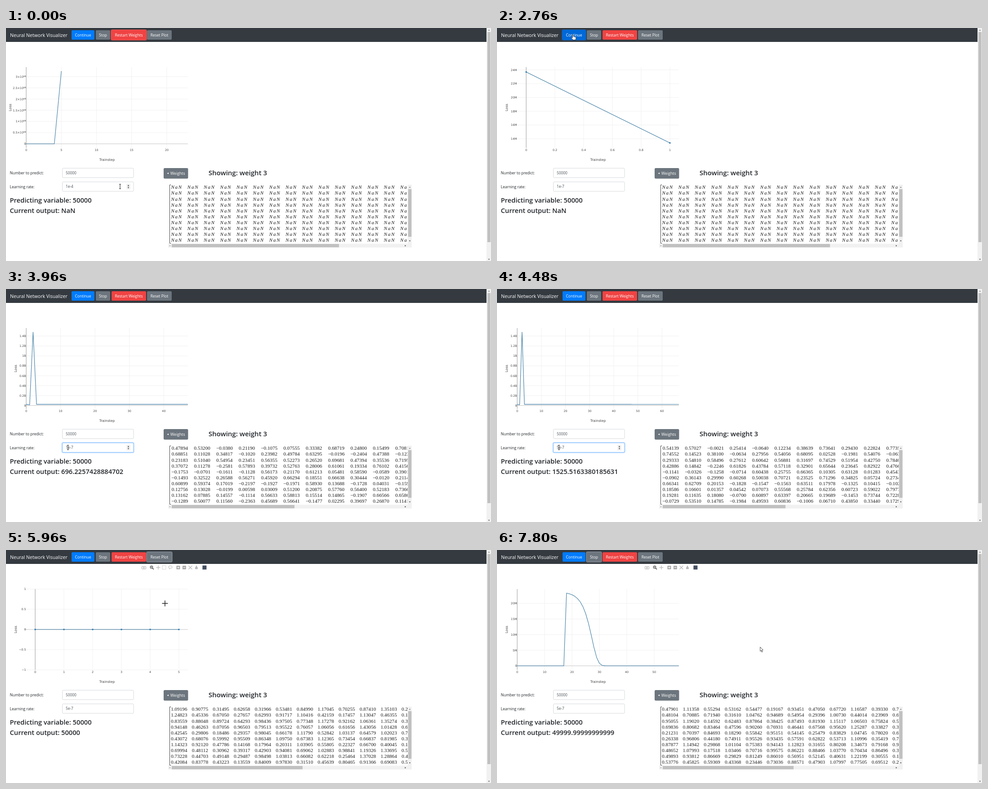
Write an HTML page with a canvas that moves like this. It is 1080 by 519 pixels and loops after 7.84 s.

```html
<!DOCTYPE html>
<html lang="en">
<head>
<meta charset="utf-8">
<title>Neural Network Visualizer</title>
<style>
html, body { margin: 0; width: 100%; height: 100%; overflow: hidden; background: #fff; }
canvas { display: block; width: 100vw; height: 100vh; }
</style>
</head>
<body>
<canvas id="stage" width="1080" height="519"></canvas>
<script>
const ctx = document.getElementById('stage').getContext('2d');
const LOOP = 7840, FRAME = 40;
const ROWS = 10, COLS = 20;
const UI = '"Open Sans", "Noto Sans", sans-serif';
const TICK = '"DejaVu Sans", sans-serif';
const MATH = '"Liberation Serif", serif';

// ---------- timeline ----------
const focusKeys = [[0, 'restart'], [120, 'rate'], [960, 'continue'], [1240, 'restart'],
  [1640, 'rate'], [2480, 'reset'], [2720, 'continue'], [3600, 'rate'], [5800, 'reset'],
  [6270, 'restart'], [7350, 'stop']];
const rateKeys = [[0, '1e-4'], [200, '1e-'], [320, '1e-5'], [1760, '1e-'], [1900, '1e-7'],
  [4320, 'e-7'], [4440, '5e-7']];

// the pointer rests at each place from one time to another and glides between
const stops = [
  { x: 254, y: 353, from: 0, to: 400 },
  { x: 170, y: 16, from: 720, to: 1000 },
  { x: 299, y: 20, from: 1160, to: 1280 },
  { x: 254, y: 353, from: 1600, to: 2080 },
  { x: 340, y: 16, from: 2400, to: 2520 },
  { x: 168, y: 15, from: 2680, to: 2800 },
  { x: 138, y: 353, from: 3400, to: 4480 },
  { x: 231, y: 412, from: 4920, to: 5160 },
  { x: 340, y: 16, from: 5720, to: 5820 },
  { x: 354, y: 119, from: 5960, to: 6060 },
  { x: 272, y: 16, from: 6220, to: 6360 },
  { x: 215, y: 16, from: 7240, to: 7400 },
  { x: 586, y: 216, from: 7640, to: LOOP }
];

const keyed = (keys, t) => keys.filter(k => k[0] <= t).pop()[1];

function pointerAt(t) {
  const i = stops.findIndex(s => t <= s.to), b = stops[i];
  if (t >= b.from) return b;
  const a = stops[i - 1], u = (t - a.to) / (b.from - a.to), e = u * u * (3 - 2 * u);
  return { x: a.x + (b.x - a.x) * e, y: a.y + (b.y - a.y) * e };
}

function training(t) {
  if (t < 2480) return { run: 'diverge', step: t < 1020 ? 23 : Math.min(30, 23 + Math.floor((t - 1020) * 0.029)) };
  if (t < 2730) return { run: 'empty', step: 0 };
  if (t < 5830) {
    const s = t < 3960 ? 1 + (t - 2760) * 46 / 1200 : 47 + (t - 3960) * 38 / 960;
    return { run: 'slow', step: Math.max(0, Math.floor(s + 1e-6)) };
  }
  return { run: 'fast', step: Math.min(59, Math.floor((t - 5830) * 0.0389)) };
}

// ---------- model ----------
const GOAL = 50000, SPEEDUP = 67, RESTART = 18;

// share of the goal reached after k steps at the higher learning rate
function learned(k) {
  let f = 0.0105;
  for (let i = 0; i < k; i++) f += 0.705 * f ** 1.1 * (1 - f);
  return f;
}

function progress(run, step) {
  if (run === 'fast') return step < RESTART ? 1 : learned(step - RESTART);
  const early = 696.2257428884702 / GOAL * 1.04 ** (step - 47);
  return step < SPEEDUP ? early : Math.max(early, learned(step - SPEEDUP));
}

function loss(run, i) {
  if (run === 'diverge') {
    if (i === 5) return 3.25;
    return i < 5 || (i > 23 && i < 28) ? 0 : NaN;
  }
  if (run === 'slow' && i === 1) return 13.4;
  if (run === 'slow' && i === 2) return 1480;
  return 23.8 * (1 - progress(run, i)) ** 2;
}

const isNaNState = (run, step, t) => t < 2790 && !(run === 'diverge' && step > 23 && step < 28);

function outputText(run, step, t) {
  if (isNaNState(run, step, t)) return 'NaN';
  if (run === 'diverge') return '3.738738274169252e+' + Math.round(53 / 3 ** (27 - step));
  return String(GOAL * progress(run, step));
}

function random(seed, i, j) {
  const v = Math.sin(seed * 91.7 + i * 12.9898 + j * 78.233) * 43758.5453;
  return v - Math.floor(v);
}

const grid = cell => Array.from({ length: ROWS }, (_, i) => Array.from({ length: COLS }, (_, j) => cell(i, j)));

// random starting weights plus an outer product that grows with training
function cells(run, step, t) {
  if (isNaNState(run, step, t)) return grid(() => 'NaN');
  if (run === 'diverge') {
    const scale = 0.83 ** (27 - step);
    return grid((i, j) => ((0.97 + 0.5 * random(1, i, 0)) * (8.9 + 5.5 * random(2, 0, j)) * scale)
      .toPrecision(7).replace('.', ''));
  }
  const seed = run === 'fast' && step >= RESTART ? 7 : 4;
  const amount = progress(run, step) ** 0.3;
  return grid((i, j) => {
    const start = -0.42 + 0.95 * random(seed, i, j);
    const gain = (0.92 + 0.16 * random(seed + 1, i, 0)) * (0.45 + 0.55 * random(seed + 2, 0, j));
    return (start + gain * amount).toFixed(7).slice(0, 7).replace('-', '\u2212');
  });
}

// ---------- drawing helpers ----------
function text(s, x, y, size, color, { font = UI, weight = 400, align = 'left', style = '' } = {}) {
  ctx.font = `${style} ${weight} ${size}px ${font}`;
  ctx.textAlign = align;
  ctx.fillStyle = color;
  ctx.fillText(s, x, y);
}

function box(x, y, w, h, r, fill, stroke, lw = 1) {
  ctx.beginPath();
  ctx.roundRect(x, y, w, h, r);
  if (fill) { ctx.fillStyle = fill; ctx.fill(); }
  if (stroke) { ctx.strokeStyle = stroke; ctx.lineWidth = lw; ctx.stroke(); }
}

function line(points, color, lw) {
  ctx.beginPath();
  points.forEach(([x, y]) => ctx.lineTo(x, y));
  ctx.strokeStyle = color;
  ctx.lineWidth = lw;
  ctx.stroke();
}

function shape(points, fill, stroke, lw = 1) {
  ctx.beginPath();
  points.forEach(([x, y]) => ctx.lineTo(x, y));
  ctx.closePath();
  ctx.fillStyle = fill;
  ctx.fill();
  if (stroke) { ctx.strokeStyle = stroke; ctx.lineWidth = lw; ctx.stroke(); }
}

function circle(x, y, r, fill, stroke, lw = 1.2) {
  box(x - r, y - r, 2 * r, 2 * r, r, fill, stroke, lw);
}

function plus(x, y, r, color, lw) {
  line([[x - r, y], [x + r, y]], color, lw);
  line([[x, y - r], [x, y + r]], color, lw);
}

function arrow(x, y, dx, dy, r, color) {
  shape([[x + dx * r, y + dy * r], [x - dx * r + dy * r, y - dy * r + dx * r],
    [x - dx * r - dy * r, y - dy * r - dx * r]], color);
}

// ---------- page parts ----------
const grey = { fill: '#6c757d', hover: '#5a6268', ring: '#868e95' };
const buttons = [
  { id: 'continue', label: 'Continue', x: 146, w: 51, fill: '#007bff', hover: '#0069d9', ring: '#0a66cc' },
  { id: 'stop', label: 'Stop', x: 200, w: 32, ...grey },
  { id: 'restart', label: 'Restart Weights', x: 235, w: 77, fill: '#f04343', hover: '#d52f33', ring: '#f8504c' },
  { id: 'reset', label: 'Reset Plot', x: 314, w: 55, ...grey }
];
const hits = (b, p) => p.y > 4 && p.y < 26 && p.x > b.x && p.x < b.x + b.w;
const inField = (p, y) => p.x > 125 && p.x < 284 && p.y > y && p.y < y + 22;

function navbar(focus, p) {
  ctx.fillStyle = '#343a40';
  ctx.fillRect(0, 0, 1070, 31);
  text('Neural Network Visualizer', 9, 19.5, 10.6, '#fff');
  for (const b of buttons) {
    if (focus === b.id) box(b.x - .8, 4.2, b.w + 1.6, 22.6, 2.5, null, b.ring, 1.6);
    box(b.x, 5, b.w, 21, 2, hits(b, p) ? b.hover : b.fill);
    text(b.label, b.x + b.w / 2, 18.5, 8.5, '#fff', { align: 'center' });
  }
}

function pageScrollbar() {
  ctx.fillStyle = '#f1f1f1';
  ctx.fillRect(1070, 0, 10, 519);
  ctx.fillStyle = '#c1c1c1';
  ctx.fillRect(1072, 9, 7, 468);
  arrow(1075.5, 4.5, 0, -1, 1.5, '#777');
  arrow(1075.5, 515.5, 0, 1, 1.5, '#555');
}

function field(label, value, y, focused, spinner) {
  text(label, 8.5, y + 14, 8.5, '#212529');
  if (focused) box(124.7, y - .8, 160, 22.6, 3, null, 'rgba(0,123,255,.28)', 2);
  box(125.5, y, 158.5, 21, 2, '#fff', focused ? '#80bdff' : '#ced4da', .9);
  text(value, 133, y + 13.6, 8.3, '#495057');
  if (spinner) {
    box(268, y + 4, 9, 13, 1, '#f1f1f1');
    arrow(272.5, y + 7.8, 0, -1, 1.6, '#444');
    arrow(272.5, y + 13.2, 0, 1, 1.6, '#444');
  }
}

function ticks(lo, hi) {
  const rough = (hi - lo) / 9, base = 10 ** Math.floor(Math.log10(rough)), out = [];
  const d = base * [2, 5, 10].find(m => base * m >= rough - 1e-9);
  for (let i = Math.ceil(lo / d - 1e-6); i * d <= hi + d * 1e-6; i++) out.push(+(i * d).toFixed(6));
  return out;
}

const signed = v => String(v).replace('-', '\u2212');

function yLabel(v, y, run, hi) {
  const opt = { font: TICK, align: 'right' };
  if (run === 'diverge' && v) {
    text('68', 44.5, y + .3, 4.4, '#444', opt);
    text(v + '\u00d710', 39, y + 2.3, 6.4, '#444', opt);
    return;
  }
  let s = signed(v);
  if (v && hi > 1000) s = v / 1000 + 'B';
  else if (v && hi > 5) s = v + 'M';
  text(s, 44.5, y + 2.3, 6.4, '#444', opt);
}

function plot(run, step) {
  const L = 45, R = 405, T = 87, B = 267;
  const empty = run === 'empty', markers = !empty && step < 19;
  const data = empty ? [] : Array.from({ length: step + 1 }, (_, i) => loss(run, i));
  const known = data.filter(v => !isNaN(v));
  let lo = empty ? -1 : Math.min(...known), hi = empty ? 4 : Math.max(...known);
  let padY = empty ? 0 : markers ? 11 : 9;
  if (hi === lo) { lo = -1; hi = 1; padY = 0; }
  const padX = markers ? 20 : 0, x0 = empty ? -1 : 0, x1 = empty ? 6 : Math.max(step, 1);
  const kx = (R - L - 2 * padX) / (x1 - x0), ky = (B - T - 2 * padY) / (hi - lo);
  const X = v => L + padX + (v - x0) * kx, Y = v => B - padY - (v - lo) * ky;
  const top = hi + padY / ky, bottom = lo - padY / ky;

  const xs = ticks(x0 - padX / kx, x1 + padX / kx), ys = ticks(bottom, top);
  xs.forEach(v => v && line([[X(v), T], [X(v), B]], '#eee', .8));
  ys.forEach(v => v && line([[L, Y(v)], [R, Y(v)]], '#eee', .8));
  if (bottom <= 0) line([[L - 3, Y(0)], [R, Y(0)]], '#c4c4c4', 1.2);
  line([[X(0), T], [X(0), B]], '#aaa', 1.2);
  xs.forEach(v => text(signed(v), X(v), 274.3, 6.4, '#444', { font: TICK, align: 'center' }));
  ys.forEach(v => yLabel(v, Y(v), run, hi));

  ctx.lineJoin = 'round';
  ctx.beginPath();
  data.forEach((v, i) => {
    if (isNaN(v)) return;
    if (i && !isNaN(data[i - 1])) ctx.lineTo(X(i), Y(v));
    else ctx.moveTo(X(i), Y(v));
  });
  ctx.strokeStyle = '#3a7aa3';
  ctx.lineWidth = 1.1;
  ctx.stroke();
  if (markers) data.forEach((v, i) => circle(X(i), Y(v), 1.8, '#2b77ad'));

  text('Trainstep', 225, 296.2, 7.6, '#444', { font: TICK, align: 'center' });
  ctx.save();
  ctx.translate(run === 'diverge' ? 11.5 : 24.2, 177);
  ctx.rotate(-Math.PI / 2);
  text('Loss', 0, 0, 7.6, '#444', { font: TICK, align: 'center' });
  ctx.restore();
}

function toolbar(markers) {
  const y = 39, g = '#b8b8b8', d = '#555', off = markers ? 0 : 27;
  box(302.5 + off, y - 2.5, 9, 6, 1.2, null, g, 1.2);
  circle(307 + off, y + .5, 1.4, null, g);
  circle(324 + off, y - .8, 2.8, null, d);
  line([[326 + off, y + 1.4], [329 + off, y + 4.2]], d, 1.8);
  plus(324 + off, y - .8, 1.4, d, 1);
  plus(339 + off, y, 4.5, g, 1.3);
  if (markers) {
    ctx.setLineDash([1.5, 1]);
    box(348, y - 4, 8, 8, 0, null, g);
    ctx.setLineDash([]);
    box(362, y - 3.7, 8, 5.4, 2.7, null, g);
    line([[363.5, y + 1], [364.5, y + 4]], g, 1);
  }
  box(379.5, y - 4, 8, 8, .8, '#aaa');
  plus(383.5, y, 2.3, '#fff', 1.2);
  box(393, y - 4, 8, 8, .8, '#aaa');
  line([[394.7, y], [399.3, y]], '#fff', 1.2);
  line([[406.5, y - 4], [414.5, y + 4]], g, 1.2);
  line([[414.5, y - 4], [406.5, y + 4]], g, 1.2);
  arrow(424, y - 2, 0, -1, 3, g);
  box(421, y, 6, 3.5, 0, g);
  box(437.5, y - 4.5, 9, 9, 0, '#444f60');
}

function matrix(rows) {
  const nan = rows[0][0] === 'NaN', big = !nan && !rows[0][0].includes('.');
  const negative = rows.some(r => r.some(s => s[0] === '\u2212'));
  const width = nan ? 26.45 : big ? 39 : negative ? 39.8 : 36.7, pitch = width + 10;
  const opt = { font: MATH, align: 'center', style: nan ? 'italic' : '' };
  ctx.save();
  ctx.beginPath();
  ctx.rect(361, 348, 533.5, 133);
  ctx.clip();
  line([[367.5, 349.5], [364.5, 349.5], [364.5, 479.5], [367.5, 479.5]], '#333', .9);
  ctx.letterSpacing = nan ? '1.7px' : '0px';
  rows.forEach((r, i) => r.forEach((s, j) =>
    text(s, 367 + width / 2 + j * pitch, 358.4 + i * 13.06, 11.2, '#1a1a1a', opt)));
  ctx.restore();

  ctx.fillStyle = '#f1f1f1';
  ctx.fillRect(894.5, 349, 9, 140);
  ctx.fillRect(361, 480.5, 534, 8.5);
  ctx.fillStyle = '#c1c1c1';
  ctx.fillRect(895.5, 359, 7.5, 106);
  ctx.fillRect(369, 481, 274500 / (COLS * pitch + 8), 7.5);
  arrow(899.2, 354.5, 0, -1, 1.4, '#777');
  arrow(899.2, 474.5, 0, 1, 1.4, '#444');
  arrow(364.5, 485, -1, 0, 1.4, '#aaa');
  arrow(889.5, 485, 1, 0, 1.4, '#333');
}

function pointer(p) {
  const { x, y } = p, at = pts => pts.map(([a, b]) => [x + a, y + b]);
  const overText = x < 300 && y > 376 && y < 418;
  if (buttons.some(b => hits(b, p))) {
    shape(at([[0, 0], [1.8, 0], [2.2, 4], [7, 5.2], [8, 6.5], [7, 11.5], [1.5, 11.5], [-2.5, 7], [-1.5, 5.8], [.2, 7]]),
      '#fff', '#222', .8);
  } else if (inField(p, 312) || inField(p, 343) || overText) {
    line(at([[0, -5], [0, 5]]), '#222', 1);
    [-5, 5].forEach(end => line(at([[-2, end], [2, end]]), '#222', 1));
  } else if (x > 45 && x < 405 && y > 87 && y < 267) {
    plus(x, y, 6.5, '#222', 1.5);
  } else {
    shape(at([[0, 0], [0, 9.6], [2.2, 7.6], [3.8, 11.4], [5.2, 10.8], [3.6, 7.1], [6.6, 6.8]]), '#fff', '#222', .8);
  }
}

function draw(t) {
  const { run, step } = training(t), p = pointerAt(t), focus = keyed(focusKeys, t);
  ctx.fillStyle = '#fff';
  ctx.fillRect(0, 0, 1080, 519);
  navbar(focus, p);
  pageScrollbar();
  plot(run, step);
  if (t > 7400 || (p.y > 31 && p.y < 305 && p.x < 450)) toolbar(run !== 'empty' && step < 19);

  const editing = focus === 'rate';
  field('Number to predict:', '50000', 312.3, false, false);
  field('Learning rate:', keyed(rateKeys, t), 342.8, editing, editing || inField(p, 343));
  const head = { weight: 600 };
  text('Predicting variable: 50000', 8.5, 388.5, 14.7, '#212529', head);
  text('Current output: ' + outputText(run, step, t), 8.5, 412.4, 14.7, '#212529', head);
  text('Showing: weight 3', 451, 328, 15, '#212529', head);

  box(351, 312, 54.5, 23.5, 2.5, '#6c757d');
  arrow(360.3, 323.7, -1, 0, 1.8, '#fff');
  text('Weights', 366, 327, 8.8, '#fff');
  matrix(cells(run, step, t));
  pointer(p);
}

const began = performance.now();
function tick() {
  const t = (performance.now() - began) % LOOP;
  draw(Math.floor(t / FRAME) * FRAME);
  requestAnimationFrame(tick);
}
tick();
</script>
</body>
</html>
```
